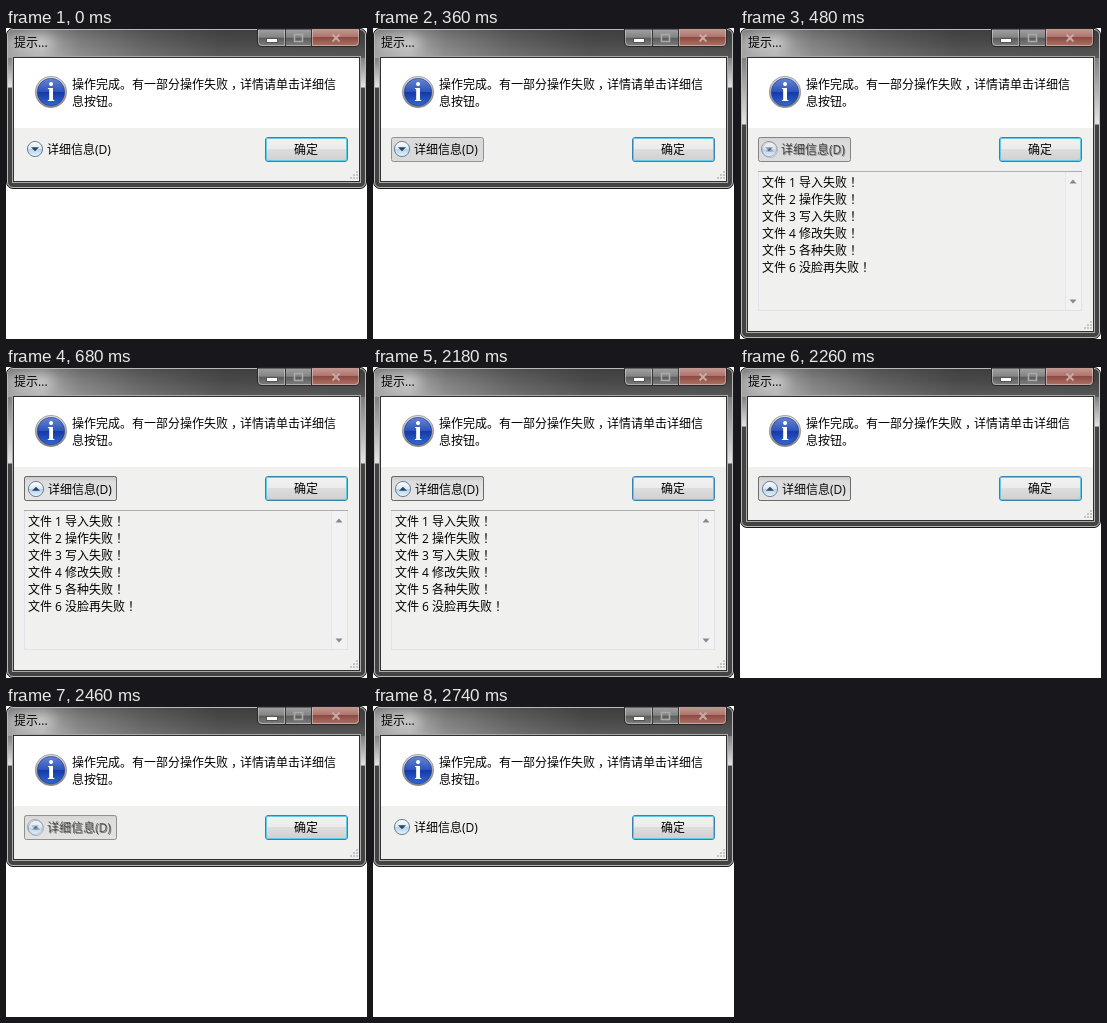
Animation, 361 px wide and 311 px high, one loop 3820 ms. Source, as an HTML page:

```html
<!DOCTYPE html>
<html lang="zh-CN">
<head>
<meta charset="utf-8">
<style>
html, body { margin: 0; width: 100%; height: 100%; overflow: hidden; background: #fff; }
svg { display: block; }
text { font: 12px "Open Sans", "Noto Sans CJK SC", "Noto Sans CJK", sans-serif; fill: #000; white-space: pre; }
.info { font: bold 27px "Liberation Serif", serif; fill: #fff; text-anchor: middle; }
</style>
</head>
<body>
<svg id="stage" width="361" height="311" viewBox="0 0 361 311"></svg>
<script>
const stage = document.getElementById('stage');

const gradient = (id, stops, across = false) =>
  `<linearGradient id="${id}" x2="${+across}" y2="${+!across}">` +
  stops.map(([at, color, alpha = 1]) => `<stop offset="${at}" stop-color="${color}" stop-opacity="${alpha}"/>`).join('') +
  '</linearGradient>';
const rect = (x, y, w, h, fill, more = '') =>
  `<rect x="${x}" y="${y}" width="${w}" height="${h}" fill="${fill}" ${more}/>`;
const outline = (x, y, w, h, color, r = 0, fill = 'none') =>
  rect(x + .5, y + .5, w - 1, h - 1, fill, `rx="${r}" stroke="${color}"`);
const path = (d, fill, more = '') => `<path d="${d}" fill="${fill}" ${more}/>`;
// Full-width marks sit in the middle of their cell.
const text = (x, y, s, more = '') => `<text x="${x}" y="${y}" ${more}>` +
  s.replace(/([，！])(.?)/g, '<tspan dx="3">$1</tspan><tspan dx="-3">$2</tspan>') + '</text>';

const defs = '<defs>' +
  gradient('bar', [[0, '#999'], [.1, '#b0b0b0'], [.2, '#858585'], [.38, '#636363'], [.6, '#4a4a4a'], [1, '#454545']], true) +
  gradient('shade', [[0, '#222', .3], [.4, '#333', .1], [1, '#fff', .1]]) +
  gradient('side', [[0, '#7d7d7d'], [.4, '#a8a8a8'], [.97, '#e4e4e4'], [1, '#434343']]) +
  gradient('caption', [[0, '#a2a2a2'], [.48, '#838383'], [.5, '#5b5b5b'], [1, '#808080']]) +
  gradient('close', [[0, '#c39a94'], [.48, '#ad736b'], [.5, '#8f4b43'], [1, '#ad7166']]) +
  gradient('button', [[0, '#f3f3f3'], [.48, '#ebebeb'], [.5, '#dddddd'], [1, '#cfcfcf']]) +
  gradient('sunken', [[0, '#c6c6c6'], [.2, '#dcdcdc'], [1, '#e6e6e6']]) +
  gradient('ring', [[0, '#e4e4e4'], [1, '#7d7d7d']]) +
  gradient('blue', [[0, '#6685d0'], [.48, '#2f55bd'], [.52, '#1639a6'], [1, '#3168d6']]) +
  gradient('orb', [[0, '#fff'], [.48, '#dbe9f5'], [.52, '#b5d2ea'], [1, '#e6f5ff']]) +
  '<clipPath id="barClip"><path d="M2 30V7Q2 2 7 2H354Q359 2 359 7V30Z"/></clipPath>' +
  '<filter id="blur" x="-50%" y="-100%" width="200%" height="300%"><feGaussianBlur stdDeviation="6"/></filter></defs>';

function captionButtons() {
  return path('M251.5 1V14Q251.5 18.5 256 18.5H349Q353.5 18.5 353.5 14V1Z', 'url(#caption)', 'stroke="#292929"') +
    path('M306 1V18H349Q353 18 353 14V1Z', 'url(#close)') +
    path('M252.5 2V14Q252.5 17.5 256 17.5H349Q352.5 17.5 352.5 14V2M278.5 2V17M306.5 2V17', 'none', 'stroke="#ddd" stroke-opacity=".5"') +
    path('M279.5 1V18M305.5 1V18', 'none', 'stroke="#383838"') +
    outline(260, 10, 12, 5, '#555', 0, '#fff') +
    path('M288.5 6.5H296.5V13.5H288.5Z', 'none', 'stroke="#aaa" stroke-width="1.6"') +
    path('M326.5 6.5L333.5 13.5M333.5 6.5L326.5 13.5', 'none', 'stroke="#c5aaa5" stroke-width="2"');
}

function dialog(height, content = '') {
  const sideHeight = (height - 37) / 4;
  let grip = '';
  for (let row = 0; row < 3; row++)
    for (let col = 2 - row; col < 3; col++)
      grip += rect(344 + col * 3, height - 18 + row * 3, 2, 2, '#c6c6c6');
  return outline(0, 0, 361, height, '#191919', 6.5, '#434343') +
    rect(2, 29, 5, sideHeight, 'url(#side)') + rect(354, 29, 5, sideHeight, 'url(#side)') +
    '<g clip-path="url(#barClip)">' + rect(1, 1, 359, 29, 'url(#bar)') +
    rect(1, 1, 359, 29, 'url(#shade)') +
    '<ellipse cx="25" cy="15" rx="24" ry="8" fill="#fff" opacity=".4" filter="url(#blur)"/></g>' +
    outline(1, 1, 359, height - 2, '#b9b9b9', 5.5) +
    outline(6, 28, 349, height - 34, '#aaa') +
    outline(7, 29, 347, height - 36, '#303030', 0, '#f0f0ee') +
    rect(8, 30, 345, 70, '#fff') +
    captionButtons() + text(8, 19, '提示...') +
    '<circle cx="45" cy="64" r="15.7" fill="url(#ring)" stroke="#888" stroke-width=".7"/>' +
    '<circle cx="45" cy="64" r="13.7" fill="url(#blue)" stroke="#1d3f90" stroke-width=".6"/>' +
    text(45, 73, 'i', 'class="info"') +
    text(66, 61, '操作完成。有一部分操作失败，详情请单击详细信') + text(66, 78, '息按钮。') +
    outline(259, 109, 83, 25, '#3c7fb1', 2.5, 'url(#button)') +
    outline(260, 110, 81, 23, '#5fcbe9', 1.5) +
    text(300, 126, '确定', 'text-anchor="middle"') + grip + content;
}

function fileList() {
  const results = ['导入失败', '操作失败', '写入失败', '修改失败', '各种失败', '没脸再失败'];
  return outline(18, 143, 324, 140, '#e2e3ea', 0, '#f0f0ee') +
    rect(18, 143, 324, 1, '#abadb3') +
    rect(325, 144, 16, 138, '#f2f2f2') + rect(325, 144, 1, 138, '#e6e7ec') +
    path('M329.5 155.5L333 151.5L336.5 155.5ZM329.5 271.5L333 275.5L336.5 271.5Z', '#888') +
    results.map((result, i) => text(22, 159 + i * 17, `文件 ${i + 1} ${result}！`)).join('');
}

function label(id, shift, arrow) {
  return `<g id="${id}" transform="translate(${shift} ${shift})">` +
    '<circle cx="29" cy="121" r="7.6" fill="url(#orb)" stroke="#6c8095"/>' +
    path(`M25 ${121 - arrow * 1.8}h8l-4 ${arrow * 4}z`, '#29435e') +
    text(41, 126, '详细信息(D)') + '</g>';
}

stage.innerHTML = defs +
  `<g id="closed">${dialog(161)}</g><g id="open">${dialog(311, fileList())}</g>` +
  `<g id="hover">${outline(18, 109, 93, 25, '#929292', 2, '#dadada')}</g>` +
  `<g id="pressed">${outline(18, 109, 93, 25, '#696969', 2, 'url(#sunken)')}</g>` +
  label('down', 0, 1) + label('up', 1, -1);

// time, hover opacity, pressed opacity, expanded
const steps = [
  [0, 0, 0, 0], [120, .25, 0, 0], [200, .5, 0, 0], [280, .75, 0, 0], [360, 1, 0, 0],
  [440, 1, .15, 1], [480, 1, .33, 1], [520, 1, .5, 1], [600, 1, .75, 1], [680, 1, 1, 1],
  [2220, 1, 1, 1], [2260, 1, .95, 0], [2300, 1, .85, 0], [2340, .9, .72, 0],
  [2380, .8, .6, 0], [2420, .65, .46, 0], [2500, .48, .3, 0], [2580, .3, .17, 0],
  [2660, .15, .07, 0], [2740, 0, 0, 0]
];
const part = id => document.getElementById(id);
const fade = (id, alpha) => part(id).setAttribute('opacity', alpha);

function draw(now) {
  const time = now % 3820;
  const [, hover, press, open] = steps.findLast(step => step[0] <= time);
  fade('hover', hover);
  fade('pressed', press);
  fade('down', 1 - press);
  fade('up', press);
  part('open').style.display = open ? '' : 'none';
  part('closed').style.display = open ? 'none' : '';
}

const start = performance.now();
function tick() {
  draw(performance.now() - start);
  requestAnimationFrame(tick);
}
tick();
</script>
</body>
</html>
```
